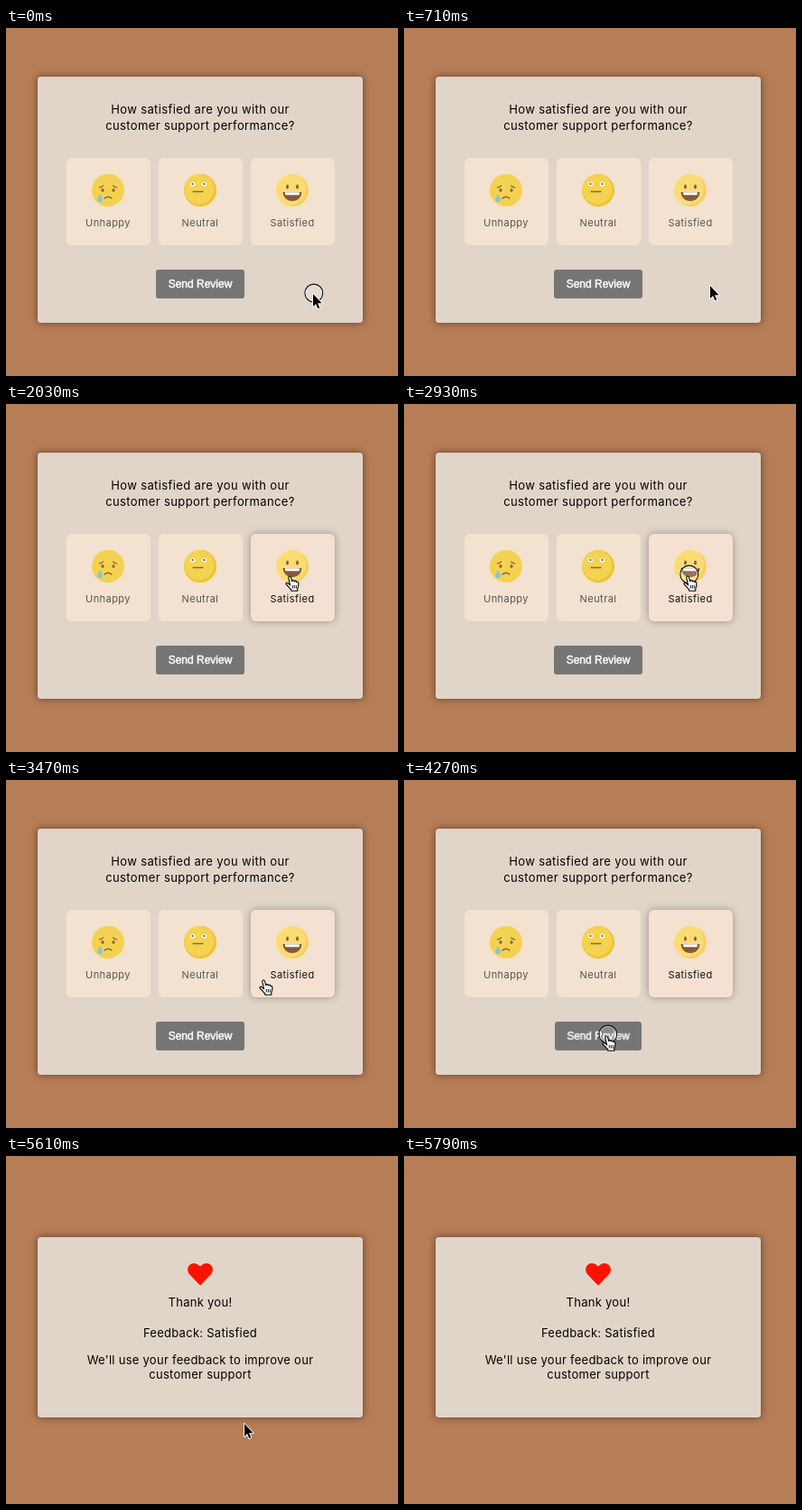
These frames come from a looping animation (434x386 px, 6.26 s). An HTML page:

```html
<!DOCTYPE html>
<html lang="en">
<head>
<meta charset="utf-8">
<title>Feedback form</title>
<style>
html, body { margin: 0; width: 100%; height: 100%; overflow: hidden; background: #b77d57; }
svg { display: block; width: 434px; height: 386px; }
text { text-anchor: middle; font: 13px Montserrat, Inter, sans-serif; letter-spacing: .27px; fill: #000; }
.title { letter-spacing: .38px; }
.label { font-size: 11px; letter-spacing: .45px; fill: #555; }
.panel { fill: #e1d5c9; filter: drop-shadow(0 0 4px rgba(0, 0, 0, .5)); }
.card { fill: #f3e2cf; }
.hot { fill: #f4e1d1; filter: drop-shadow(0 0 4px rgba(0, 0, 0, .32)); }
.button text { font: 12px "Liberation Sans", Arial, sans-serif; letter-spacing: 0; fill: #fff; stroke: #fff; stroke-width: .45px; }
.button { transform-origin: 215px 284px; }
.line { fill: none; stroke: #8a693c; stroke-width: 1.3; stroke-linecap: round; }

/* Every change is a hard step on one 6.26 s clock. */
.form, .thanks, .heart, .hot, .picked, .button, .cursor, .arrow, .hand, .ring { animation: 6260ms step-end infinite; }
.form { animation-name: form; }
.thanks { animation-name: thanks; }
.heart { animation-name: heart; }
.hot { animation-name: hot; }
.picked { animation-name: picked; }
.button { animation-name: press; }
.cursor { animation-name: move; }
.arrow { animation-name: arrow; }
.hand { animation-name: hand; }
.ring { animation-name: ring; }

@keyframes form { 0% { opacity: 1 } 69.64%, 100% { opacity: 0 } }
@keyframes thanks { 0% { opacity: 0 } 69.64%, 100% { opacity: 1 } }
@keyframes heart { 0% { opacity: 0 } 70.92%, 100% { opacity: 1 } }
@keyframes hot { 0% { opacity: 0 } 14.21%, 100% { opacity: 1 } }
@keyframes picked { 0% { fill: #555 } 14.21%, 100% { fill: #111 } }
@keyframes press { 0% { transform: none } 68.21% { transform: scale(.98) } 69.64%, 100% { transform: none } }
@keyframes ring {
  0%, 29.55%, 46.8%, 68.21% { opacity: 1 }
  1.27%, 32.42%, 49.68%, 69.64%, 100% { opacity: 0 }
}
@keyframes arrow {
  0%, 56.86%, 69.64% { opacity: 1 }
  14.21%, 59.74%, 92.49%, 100% { opacity: 0 }
}
@keyframes hand {
  0%, 56.86%, 69.64%, 100% { opacity: 0 }
  14.21%, 59.74% { opacity: 1 }
}
@keyframes move {
  0% { transform: translate(340px, 295px) }
  11.34% { transform: translate(339px, 286px) }
  12.77% { transform: translate(334px, 265px) }
  14.21% { transform: translate(328px, 238px) }
  15.49% { transform: translate(324px, 217px) }
  16.93% { transform: translate(322px, 209px) }
  19.8% { transform: translate(321px, 207px) }
  21.24% { transform: translate(319.5px, 202px) }
  22.52% { transform: translate(317px, 196px) }
  23.96% { transform: translate(315.5px, 191.5px) }
  25.23% { transform: translate(315px, 190px) }
  55.43% { transform: translate(286px, 221px) }
  56.86% { transform: translate(265px, 243px) }
  58.3% { transform: translate(247px, 260px) }
  59.74% { transform: translate(234px, 274px) }
  61.02% { transform: translate(227px, 281px) }
  62.45% { transform: translate(225px, 283px) }
  69.64% { transform: translate(223.5px, 282px) }
  89.61% { transform: translate(264px, 297px) }
  91.05%, 100% { transform: translate(355px, 329px) }
}
</style>
</head>
<body>
<svg viewBox="0 0 434 386">
  <g class="form">
    <rect class="panel" x="35" y="54" width="360" height="273" rx="4"/>
    <text class="title" x="215" y="95">How satisfied are you with our</text>
    <text class="title" x="215" y="113">customer support performance?</text>

    <rect class="card" x="67" y="144" width="93" height="97" rx="6"/>
    <rect class="card" x="169" y="144" width="93" height="97" rx="6"/>
    <rect class="card" x="271" y="144" width="93" height="97" rx="6"/>
    <rect class="hot" x="271" y="144" width="93" height="97" rx="6"/>

    <g transform="translate(113 180)">
      <circle r="18" fill="#f3d251"/>
      <path class="line" d="M-9.5-3.2Q-7-3.5-5.5-5M5.5-5Q7-3.5 9.5-3.2M-4 9Q0 5.5 4 9"/>
      <ellipse cx="-6" cy="0" rx="1.6" ry="2" fill="#8a693c"/>
      <ellipse cx="6" cy="0" rx="1.6" ry="2" fill="#8a693c"/>
      <path d="M-9 4.5C-10.5 7-11.8 8.8-11.8 10.4A2.8 2.8 0 0 0-6.2 10.4C-6.2 8.8-7.5 7-9 4.5Z" fill="#7cc9e0"/>
    </g>

    <g transform="translate(215 180)">
      <circle r="18" fill="#f0c32f"/>
      <circle cx="-1.1" cy="-1.1" r="16.5" fill="#f5d350"/>
      <ellipse cx="-8.5" cy="-6.8" rx="2.6" ry="2.3" fill="#fff"/>
      <ellipse cx="4.5" cy="-6.8" rx="2.6" ry="2.3" fill="#fff"/>
      <circle cx="-8.5" cy="-7" r="1.1" fill="#5b4a3a"/>
      <circle cx="4.5" cy="-7" r="1.1" fill="#5b4a3a"/>
      <path class="line" d="M-8 1.5H3"/>
    </g>

    <g transform="translate(317 180)">
      <circle r="18" fill="#fbdc74"/>
      <path d="M9-15.6A18 18 0 0 1-9 15.6A18.5 18.5 0 0 0 9-15.6" fill="#f6d066"/>
      <ellipse cx="-5.5" cy="-4" rx="1.5" ry="2.6" fill="#8a5f3b"/>
      <ellipse cx="5.5" cy="-4" rx="1.5" ry="2.6" fill="#8a5f3b"/>
      <path d="M-10.5 2H10.5C10 8 6 12 0 12S-10 8-10.5 2Z" fill="#855a3d"/>
      <path d="M-8 2.3H8V3.8Q8 5.3 6.5 5.3H-6.5Q-8 5.3-8 3.8Z" fill="#fff"/>
    </g>

    <text class="label" x="113" y="220">Unhappy</text>
    <text class="label" x="215" y="220">Neutral</text>
    <text class="label picked" x="317" y="220">Satisfied</text>

    <g class="button">
      <rect x="166" y="268" width="98" height="32" rx="3" fill="#757575"/>
      <text x="215" y="288">Send Review</text>
    </g>
  </g>

  <g class="thanks">
    <rect class="panel" x="35" y="90" width="360" height="200" rx="4"/>
    <path class="heart" fill="#f10" d="M214.1 142.7L203.4 131.6C200 128 200.6 122.6 204 120.2C207.2 118 211.2 118.7 213.8 121.4L215 122.6L216.2 121.4C218.8 118.7 222.8 118 226 120.2C229.4 122.6 230 128 226.6 131.6L215.9 142.7Q215 143.5 214.1 142.7Z"/>
    <text x="215" y="167">Thank you!</text>
    <text x="215" y="201">Feedback: Satisfied</text>
    <text x="215" y="231">We'll use your feedback to improve our</text>
    <text x="215" y="247">customer support</text>
  </g>

  <g class="cursor">
    <g class="ring" fill="none">
      <circle cx=".8" cy="-1" r="9" fill="#fff" fill-opacity=".15" stroke="#fff" stroke-opacity=".75" stroke-width="1.2"/>
      <circle cx=".8" cy="-1" r="9.9" stroke="#111" stroke-width="1.1"/>
    </g>
    <path class="arrow" d="M0 0V14L3.1 11.1L5.3 16.3L7.3 15.4L5.1 10.3H9.6Z" stroke="#fff" stroke-width="1.8" paint-order="stroke" stroke-linejoin="round"/>
    <g class="hand">
      <g transform="translate(-6)" stroke="#000" stroke-width="1.1" stroke-linejoin="round" fill="#fff">
        <path d="M5.6 11L3.9 3.2C3.4.7 5.8.1 6.5 2.4L7.7 6.6C8.2 5.2 10.2 5.4 10.4 6.9C10.9 5.9 12.5 6.2 12.7 7.6C13.4 6.9 14.8 7.4 14.9 9C15 11.5 14.5 13 13.8 14.5V17.3H6.8V16C5 14.2 3.3 11.8 1.2 10C.3 8.9 1.6 7.9 2.9 8.6C4 9.2 4.9 10 5.6 11Z"/>
        <path fill="none" stroke-width=".9" d="M8.3 11V14.6M10.3 11V14.6M12.3 11V14.6"/>
      </g>
    </g>
  </g>
</svg>
</body>
</html>
```
